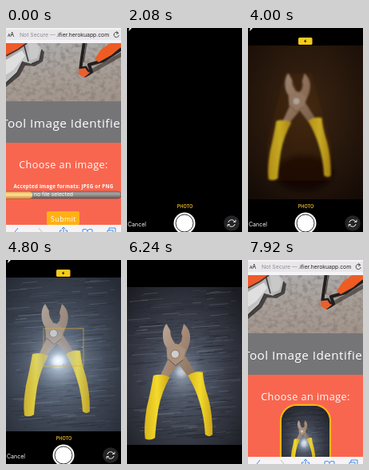
An HTML page that plays this animation: 144x256 px, repeating every 8000 ms.

```html
<!DOCTYPE html>
<html lang="en">
<head>
<meta charset="utf-8">
<title>Tool Image Identifier</title>
<style>
  html, body { margin: 0; width: 100%; height: 100%; overflow: hidden; background: #000; }
  svg { display: block; width: 100vw; height: 100vh; }
  text { font-family: "Open Sans", sans-serif; }
  .ui { font-family: Inter, "Liberation Sans", sans-serif; }
  .mid { text-anchor: middle; }
  .wide { letter-spacing: .45px; }
</style>
</head>
<body>
<svg viewBox="0 0 144 256" xmlns="http://www.w3.org/2000/svg">
  <defs>
    <linearGradient id="stone" x1="0" y1="0" x2=".2" y2="1">
      <stop offset="0" stop-color="#aeb0b1"/><stop offset=".5" stop-color="#a9a19b"/><stop offset="1" stop-color="#a3968d"/>
    </linearGradient>
    <linearGradient id="steel" x1="0" y1="0" x2="1" y2="1">
      <stop offset="0" stop-color="#8f9093"/><stop offset=".5" stop-color="#c6c6c7"/><stop offset="1" stop-color="#77777a"/>
    </linearGradient>
    <linearGradient id="field" x1="0" y1="0" x2="0" y2="1">
      <stop offset="0" stop-color="#8f8684"/><stop offset=".35" stop-color="#aaa19e"/><stop offset="1" stop-color="#5c5958"/>
    </linearGradient>
    <linearGradient id="pick" x1="0" y1="0" x2="0" y2="1">
      <stop offset="0" stop-color="#f0b04c"/><stop offset=".45" stop-color="#ffe0a0"/><stop offset="1" stop-color="#d98e2e"/>
    </linearGradient>
    <linearGradient id="metal" x1="0" y1="0" x2="1" y2="1">
      <stop offset="0" stop-color="#b7a596"/><stop offset=".5" stop-color="#a58a76"/><stop offset="1" stop-color="#84705f"/>
    </linearGradient>
    <linearGradient id="grip" x1="0" y1="0" x2="1" y2="0">
      <stop offset="0" stop-color="#d9b51c"/><stop offset=".5" stop-color="#f3da2c"/><stop offset="1" stop-color="#cba416"/>
    </linearGradient>
    <radialGradient id="desk" cx=".48" cy=".56" r=".72">
      <stop offset="0" stop-color="#5b6475"/><stop offset=".5" stop-color="#3a3e4a"/><stop offset="1" stop-color="#1b1c22"/>
    </radialGradient>
    <radialGradient id="dusk" cx=".5" cy=".4" r=".75">
      <stop offset="0" stop-color="#3b2412"/><stop offset=".6" stop-color="#25160b"/><stop offset="1" stop-color="#140b06"/>
    </radialGradient>
    <radialGradient id="glow">
      <stop offset="0" stop-color="#fff"/><stop offset=".22" stop-color="#e8f3ff" stop-opacity=".85"/>
      <stop offset=".5" stop-color="#a9c5df" stop-opacity=".3"/><stop offset="1" stop-color="#7898b8" stop-opacity="0"/>
    </radialGradient>
    <filter id="soft" x="-20%" y="-20%" width="140%" height="140%"><feGaussianBlur stdDeviation=".9"/></filter>
    <filter id="haze" x="-20%" y="-50%" width="140%" height="200%"><feGaussianBlur stdDeviation="3"/></filter>
    <filter id="pits" x="0" y="0" width="1" height="1">
      <feTurbulence type="fractalNoise" baseFrequency=".16 .2" numOctaves="4" seed="4"/>
      <feColorMatrix values="0 0 0 0 .24  0 0 0 0 .2  0 0 0 0 .18  2.6 0 0 0 -1.1"/>
    </filter>
    <clipPath id="hero"><rect y="19" width="144" height="74"/></clipPath>
    <clipPath id="finder"><rect y="22" width="144" height="193"/></clipPath>
    <clipPath id="thumb"><rect x="42" y="183" width="60" height="82" rx="19"/></clipPath>

    <g id="tool">
      <path d="M49 55C44 60 43 72 47 81L54 91L75 119L84 114L69 90L61 81C56 75 53 69 54 64Z" fill="url(#metal)"/>
      <path d="M70 55C79 63 79 73 76 82L70 97L50 121L42 117L51 98L60 82C68 79 69 71 67 66Z" fill="url(#metal)"/>
      <path d="M49 85L61 79L72 86L69 99L60 106L50 98Z" fill="#a9917e"/>
      <path d="M54 64l2 3-1 2 3 3-1 2 3 3M67 68l1 3-2 2 1 3-3 3M51 98L60 106L69 99" fill="none" stroke="#5a4a41" stroke-width=".9"/>
      <path d="M33 118Q43 115 53 120Q43 138 39 159Q36 178 35 194Q29 198 23 195Q21 181 25 157Q30 136 33 118Z" fill="url(#grip)"/>
      <path d="M75 118Q84 112 93 114Q94 128 100 146Q105 165 105 190Q101 194 96 190Q95 169 89 150Q84 133 75 118Z" fill="url(#grip)"/>
      <circle cx="59.500" cy="92" r="5" fill="#d1cec9" stroke="#736a63" stroke-width=".8"/>
    </g>
    <g id="wood">
      <rect width="144" height="198" fill="url(#desk)"/>
      <g id="grain"></g>
      <circle cx="70" cy="110" r="58" fill="url(#glow)" opacity=".22"/>
      <circle cx="68" cy="106" r="20" fill="url(#glow)" opacity=".6"/>
    </g>
    <path id="bolt" d="M1-3L-2 .5H0L-1 3L2-.6H0Z"/>
  </defs>

  <g id="page">
    <rect width="144" height="256" fill="#f9664f"/>
    <g clip-path="url(#hero)">
      <rect y="19" width="144" height="74" fill="url(#stone)"/>
      <rect y="19" width="144" height="74" filter="url(#pits)" opacity=".75"/>
      <path d="M0 74L17 60L24 47L36 48L46 42L48 30L40 24H0Z" fill="#2a2625" opacity=".75"/>
      <path d="M0 32L22 18H38L45 27L42 41L32 45L21 42L14 56L0 69Z" fill="url(#steel)"/>
      <path d="M0 40L20 28L24 35L10 52L0 59Z" fill="#dfdfdf"/>
      <path d="M27 19L37 20L42 28L39 38L31 40Z" fill="#c9c9ca"/>
      <path d="M22 19L28 42M45 27L42 41L32 45M0 69L14 56L21 42" fill="none" stroke="#3b393a" stroke-width="1.600"/>
      <path d="M0 18H27L15 27L0 35Z" fill="#ee5a2a"/>
      <path d="M0 35L15 27L26 19" fill="none" stroke="#4a3029" stroke-width="1.600"/>
      <path d="M101 58L148 31" stroke="#332d2a" stroke-width="5" opacity=".6"/>
      <path d="M98 17L94 45L93 54L99 60L107 55L104 46L122 41L148 24" fill="none" stroke="#211f20" stroke-width="4" stroke-linejoin="round"/>
      <path d="M111 39L119 27L132 18H146V22L132 34L116 43Z" fill="#ee5c24"/>
      <path d="M101 18L97 43" stroke="#544c48" stroke-width="1.500"/>
      <path d="M91 51L99 50L105 56L98 62L91 58Z" fill="#e9602d"/>
      <path d="M92 50L100 49L104 55" fill="none" stroke="#211f20" stroke-width="2.500"/>
    </g>
    <rect y="92" width="144" height="52" fill="#757578"/>
    <text class="mid wide" x="72" y="124.500" font-size="15.300" fill="#fff">Tool Image Identifier</text>
    <text class="mid wide" x="72" y="175.500" font-size="12.600" fill="#fff">Choose an image:</text>

    <g id="form">
      <text class="mid" x="72" y="201" font-size="6.200" font-weight="700" letter-spacing=".27" fill="#fff">Accepted image formats: JPEG or PNG</text>
      <rect x="-4" y="205" width="148" height="9" rx="4" fill="url(#field)" stroke="#57504e" stroke-width=".6"/>
      <rect x="-4" y="205.500" width="37" height="8.500" rx="4" fill="url(#pick)"/>
      <text class="ui" x="35" y="211" font-size="6.800" fill="#fff">no file selected</text>
      <rect x="51" y="230" width="41" height="17" rx="2" fill="#ffb014"/>
      <text class="mid wide" x="72" y="242.500" font-size="8.800" fill="#fff">Submit</text>
    </g>

    <g id="preview">
      <rect x="41" y="182" width="62" height="84" rx="20" fill="#343a45" stroke="#fdb414" stroke-width="2.400"/>
      <g clip-path="url(#thumb)">
        <use href="#wood" transform="translate(42 183) scale(.42)"/>
        <use href="#tool" transform="translate(45.500 181) scale(.37)"/>
        <circle cx="70" cy="231" r="12" fill="url(#glow)" opacity=".7"/>
      </g>
    </g>

    <rect width="144" height="19" fill="#f5f3f5"/>
    <rect x="-4" y="2" width="152" height="13" rx="3" fill="#e9e7ea"/>
    <text class="ui" x="2" y="11" font-size="5" fill="#111">A</text>
    <text class="ui" x="5.300" y="11" font-size="7" fill="#111">A</text>
    <text class="ui" x="17" y="11" font-size="6.800" fill="#8b8b90">Not Secure —</text>
    <text class="ui" x="63" y="11" font-size="6.800" fill="#222">.ifier.herokuapp.com</text>
    <path d="M140.500 6.400A3.100 3.100 0 1 0 141.300 9M138.400 4.200L140.800 6.500L138 7.500" fill="none" stroke="#222" stroke-width=".8"/>

    <rect y="247" width="144" height="9" fill="#f5f3f5"/>
    <g fill="none" stroke="#2f80ea" stroke-width=".9">
      <path d="M15 251L11 256L15 261"/>
      <path d="M41 251L45 256L41 261" stroke="#b9bdc5"/>
      <path d="M70 254H67.500V261H76.500V254H74M72 259V250M69.800 252.200L72 250L74.200 252.200"/>
      <path d="M102 254Q99 251 96 253V261M102 254Q105 251 108 253V261M102 254V261"/>
      <path d="M127 254H134V261H127ZM129 254V251H137V258H134"/>
    </g>
  </g>

  <g id="sheet">
    <rect width="144" height="256"/>
    <g id="camera">
      <g id="view" clip-path="url(#finder)">
        <rect y="22" width="144" height="193" fill="url(#dusk)"/>
        <ellipse cx="70" cy="182" rx="36" ry="22" fill="#090504" opacity=".7" filter="url(#haze)"/>
        <use id="lit" href="#wood" y="20"/>
        <g id="edge" filter="url(#soft)">
          <path d="M-5 202L46 200L38 218H-5Z" fill="#764239"/>
          <path d="M44 200H102L150 211V218H32Z" fill="#9d645a"/>
          <path d="M47 200L35 218M84 201L149 213" stroke="#d7b4a8" stroke-width="2"/>
        </g>
        <g id="pose">
          <use id="clear" href="#tool"/>
          <g id="blurred" filter="url(#soft)">
            <use href="#tool"/>
            <path d="M44 55H80L106 150V197H20V150Z" fill="#8d430c" opacity=".12"/>
          </g>
        </g>
        <g id="torch">
          <rect y="22" width="144" height="193" fill="#7394b2" opacity=".12"/>
          <circle cx="65" cy="126" r="76" fill="url(#glow)" opacity=".35"/>
          <circle cx="65" cy="127" r="25" fill="url(#glow)"/>
        </g>
        <path id="focus" d="M47 86H97V133H47ZM72 86v3M72 133v-3M47 109.500h3M97 109.500h-3" fill="none" stroke="#d9ad2e" stroke-width=".7"/>
      </g>
      <g id="badge">
        <rect x="63" y="12" width="17.500" height="9" rx="1.500" fill="#f6ca1d"/>
        <use href="#bolt" transform="translate(71.700 16.500) scale(.9)"/>
      </g>
      <path d="M2 4L3 0H6Z" fill="#fff"/>
      <text class="ui mid" x="72.500" y="226" font-size="5.600" font-weight="600" fill="#e9b92d">PHOTO</text>
      <text class="ui" x="1" y="248.500" font-size="7" fill="#fff">Cancel</text>
      <circle cx="72" cy="245" r="13.500" fill="#fff"/>
      <circle cx="72" cy="245" r="11" fill="none" stroke="#151515" stroke-width=".9"/>
      <circle cx="131" cy="245" r="9.800" fill="#242426"/>
      <path d="M126.800 244A4.300 4.300 0 0 1 134.800 243M135.200 246A4.300 4.300 0 0 1 127.200 247M133 243.400H136V240.700M129 246.600H126V249.300" fill="none" stroke="#fff" stroke-width=".9"/>
    </g>
    <g id="review">
      <use href="#wood" y="34"/>
      <use href="#tool" transform="translate(-1 23.400) scale(1.03)"/>
    </g>
  </g>
</svg>
<script>
const LOOP = 8000;
const $ = id => document.getElementById(id);
const clamp = v => Math.max(0, Math.min(1, v));
const ramp = (t, from, to) => clamp((t - from) / (to - from));
const mix = (a, b, p) => a + (b - a) * p;
const easeOut = p => 1 - (1 - p) ** 3;
const easeInOut = p => p < .5 ? 4 * p ** 3 : 1 - (2 - 2 * p) ** 3 / 2;
const show = (id, on) => { $(id).style.display = on ? "" : "none"; };
const fade = (id, p) => { $(id).setAttribute("opacity", p); };
const move = (id, value) => { $(id).setAttribute("transform", value); };

let seed = 17;
const rnd = () => (seed = seed * 16807 % 2147483647) / 2147483647;

// Wood grain: long streaks, slightly tilted, dark and light in turn.
function drawGrain(count) {
  const colours = ["#0d0f14", "#8b93a3", "#15181f"];
  let out = "";
  for (let i = 0; i < count; i++) {
    const length = 4 + rnd() * 34;
    const x = rnd() * (144 - length), y = 3 + rnd() * 190;
    out += `<path d="M${x} ${y}l${length} ${-length * .05 - rnd()}" stroke="${colours[i % 3]}" stroke-width="${.3 + rnd() * .7}" opacity=".32"/>`;
  }
  $("grain").innerHTML = out;
}
drawGrain(330);

function draw(t) {
  const up = easeOut(ramp(t, 1640, 1980));
  const down = easeInOut(ramp(t, 6840, 7260));
  move("sheet", `translate(0 ${256 * (1 - up + down)})`);
  show("sheet", t >= 1640 && t < 7260);
  show("form", t < 7260);
  show("preview", t >= 7260);

  const reviewing = t >= 5980;
  show("camera", !reviewing);
  show("review", reviewing);

  const near = easeInOut(ramp(t, 3080, 4480));
  const light = ramp(t, 4420, 4620);
  const settle = ramp(t, 5200, 5520);
  const visible = ramp(t, 2240, 2560);
  fade("view", t >= 5880 ? 0 : visible);
  show("badge", visible > 0);
  move("pose", `translate(${mix(25, 0, near)} ${mix(28, 0, near)}) scale(${mix(.69, 1, near)})`);
  move("edge", `translate(0 ${24 * near})`);
  fade("lit", light);
  fade("clear", light);
  fade("blurred", (1 - light) * mix(.72, .85, near));
  fade("torch", light * (1 - settle));
  show("focus", t >= 4480 && t < 5360);
}

function tick(now) {
  draw(now % LOOP);
  requestAnimationFrame(tick);
}
draw(0);
requestAnimationFrame(tick);
</script>
</body>
</html>
```
